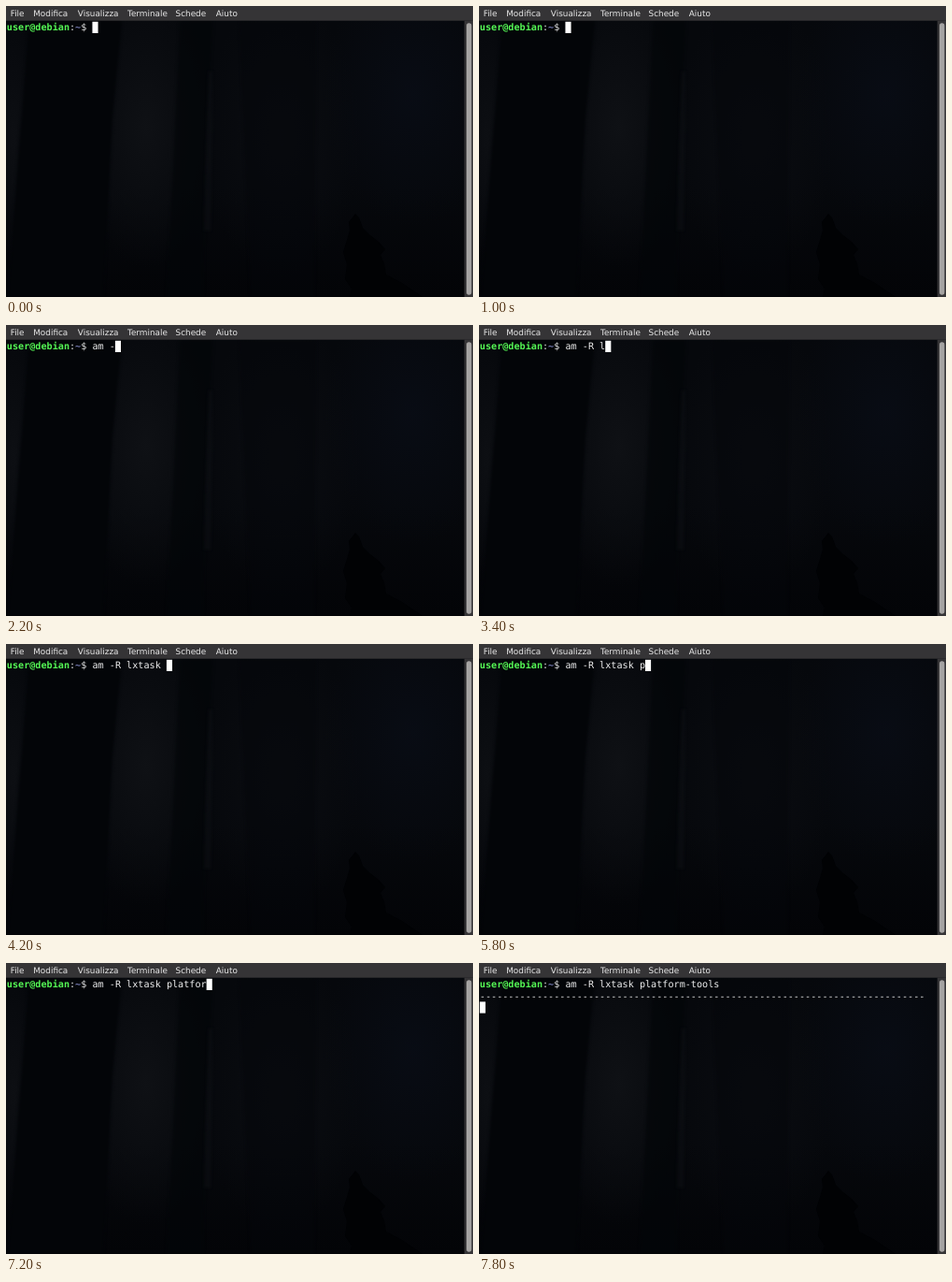
An HTML page with a canvas for the animation above (8 s loop, 500 px wide and 311 px high).

```html
<!DOCTYPE html>
<html lang="it">
<head>
<meta charset="utf-8">
<title>Terminale</title>
<style>
  html, body { margin: 0; width: 100%; height: 100%; overflow: hidden; background: #030508; }
  canvas { display: block; width: 500px; height: 311px; }
</style>
</head>
<body>
<canvas id="stage" width="500" height="311"></canvas>
<script>
const W = 500, H = 311, LOOP = 8000;
const CELL_W = 6.11, ROW_H = 12.3, LEFT = 0.8, TOP = 16.8;
const MONO = '10.15px "DejaVu Sans Mono", monospace';
const MENU = [['File', 4.7], ['Modifica', 29.2], ['Visualizza', 76.8],
              ['Terminale', 130], ['Schede', 181.5], ['Aiuto', 224.8]];

// Command line as it stands from each moment on
const TYPED = [
  [0, ''], [1400, 'a'], [1600, 'am'], [2000, 'am '], [2200, 'am -'], [2800, 'am -R'],
  [3200, 'am -R '], [3400, 'am -R l'], [3600, 'am -R lx'], [3800, 'am -R lxt'],
  [4200, 'am -R lxtask '], [5800, 'am -R lxtask p'], [6000, 'am -R lxtask pl'],
  [6200, 'am -R lxtask pla'], [6400, 'am -R lxtask plat'], [6800, 'am -R lxtask platf'],
  [7000, 'am -R lxtask platfo'], [7200, 'am -R lxtask platfor'],
  [7400, 'am -R lxtask platform-tools ']
];
const ENTER = 7800;

const ctx = document.getElementById('stage').getContext('2d');
const forest = paintForest();

function polygon(c, color, points) {
  c.fillStyle = color;
  c.beginPath();
  points.forEach(([x, y]) => c.lineTo(x, y));
  c.fill();
}

function glow(c, x, y, rx, ry, rgb, alpha) {
  c.save();
  c.translate(x, y);
  c.scale(rx, ry);
  const g = c.createRadialGradient(0, 0, 0, 0, 0, 1);
  g.addColorStop(0, `rgba(${rgb},${alpha})`);
  g.addColorStop(1, `rgba(${rgb},0)`);
  c.fillStyle = g;
  c.fillRect(-1, -1, 2, 2);
  c.restore();
}

function paintForest() {
  const layer = document.createElement('canvas');
  layer.width = W;
  layer.height = H;
  const c = layer.getContext('2d');
  const sky = c.createLinearGradient(0, 16, 0, H);
  sky.addColorStop(0, '#06080c');
  sky.addColorStop(0.6, '#06080c');
  sky.addColorStop(1, '#030407');
  c.fillStyle = sky;
  c.fillRect(0, 0, W, H);

  glow(c, 150, 130, 75, 150, '17,19,23', 0.8);
  glow(c, 295, 140, 85, 150, '14,16,21', 0.6);
  glow(c, 435, 95, 95, 140, '9,13,22', 0.8);
  glow(c, 8, 140, 28, 130, '16,18,22', 0.7);

  c.filter = 'blur(1.5px)';
  polygon(c, '#030508', [[25, 16], [124, 16], [114, 120], [104, H], [2, H], [14, 150]]);
  polygon(c, 'rgba(4,6,9,.7)', [[186, 16], [222, 16], [214, 150], [211, H], [172, H], [180, 150]]);
  polygon(c, 'rgba(5,7,10,.5)', [[250, 16], [332, 16], [330, H], [262, H]]);
  polygon(c, 'rgba(17,19,23,.45)', [[217, 70], [221, 70], [219, 240], [212, 240]]);

  c.filter = 'blur(0.5px)';
  polygon(c, '#010204', [[374, 222], [378, 226], [382, 237], [390, 245], [399, 252], [406, 260],
    [401, 266], [405, 276], [407, 287], [424, 296], [446, H], [368, H], [370, 302], [363, 292],
    [365, 276], [361, 263], [365, 250], [368, 240], [367, 231]]);
  return layer;
}

function write(text, col, row, color, bold) {
  ctx.font = (bold ? 'bold ' : '') + MONO;
  ctx.fillStyle = color;
  [...text].forEach((ch, i) =>
    ctx.fillText(ch, LEFT + (col + i) * CELL_W, TOP + row * ROW_H + 9.4));
}

function cursor(col, row) {
  ctx.fillStyle = '#fff';
  ctx.fillRect(LEFT + col * CELL_W, TOP + row * ROW_H, CELL_W, 12.2);
}

function drawChrome() {
  ctx.fillStyle = '#353436';
  ctx.fillRect(0, 0, W, 15.7);
  ctx.font = '8.9px "DejaVu Sans", sans-serif';
  ctx.fillStyle = '#e8e8e8';
  MENU.forEach(([label, x]) => ctx.fillText(label, x, 10.8));

  ctx.fillStyle = '#353436';
  ctx.fillRect(490.7, 15.7, W - 490.7, H);
  ctx.fillStyle = '#a5a3a2';
  ctx.beginPath();
  ctx.roundRect(493, 18.2, 5.4, 290.5, 2.7);
  ctx.fill();
}

function draw(t) {
  ctx.textRendering = 'geometricPrecision';
  ctx.drawImage(forest, 0, 0);
  drawChrome();

  write('user@debian', 0, 0, '#55f755', true);
  write(':', 11, 0, '#e6e6e6');
  write('~', 12, 0, '#767cb4', true);
  write('$', 13, 0, '#e6e6e6');

  const line = TYPED.filter(([at]) => at <= t).pop()[1];
  write(line, 15, 0, '#f0f0f0');
  if (t < ENTER) {
    cursor(15 + line.length, 0);
  } else {
    write('-'.repeat(78), 0, 1, '#f0f0f0');
    cursor(0, 2);
  }
}

const start = performance.now();
function tick() {
  draw((performance.now() - start) % LOOP);
  requestAnimationFrame(tick);
}
tick();
</script>
</body>
</html>
```
